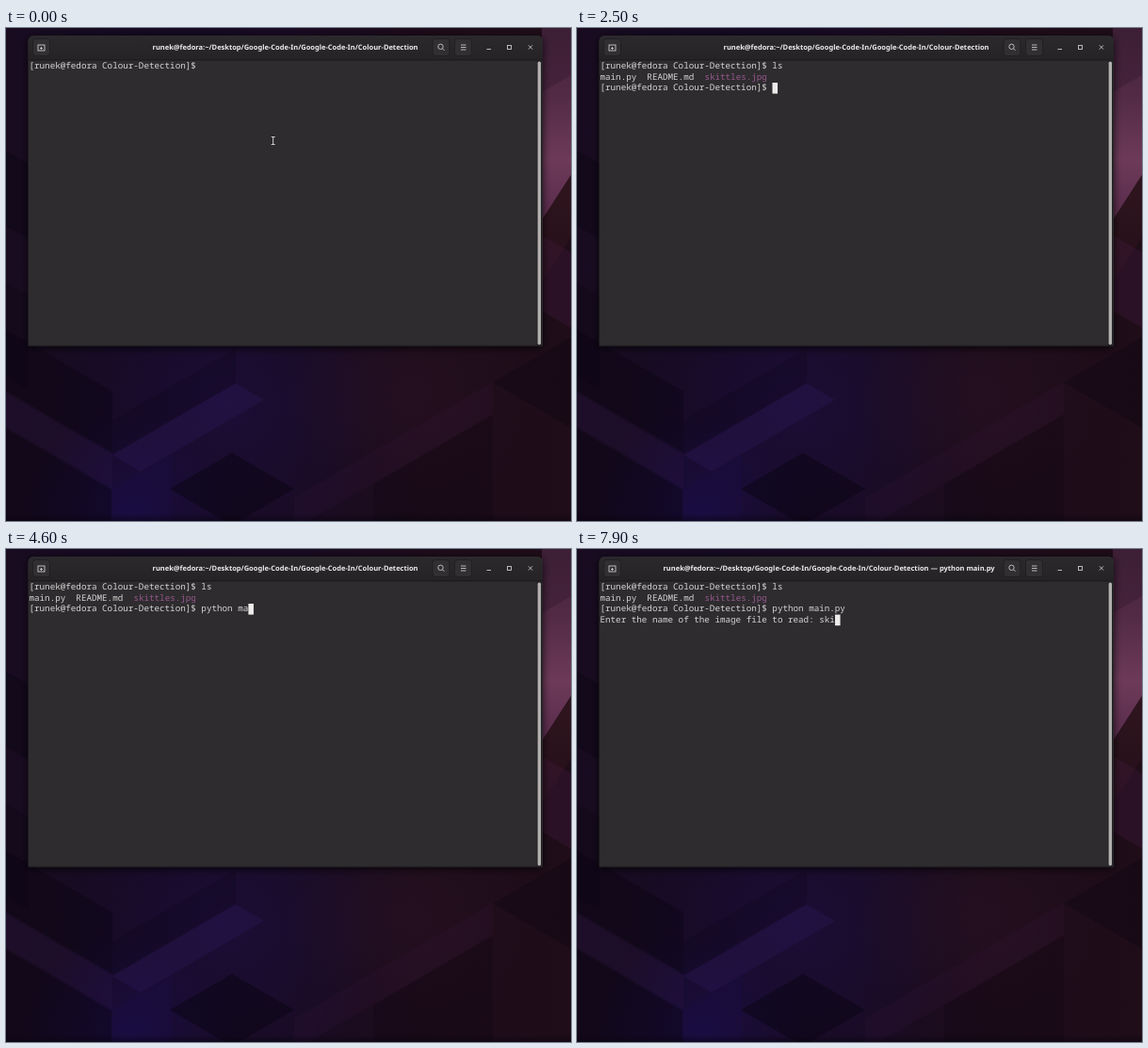
Recreate the animation shown at these times as an HTML page with a canvas. Size 600 px wide and 523 px high, loop 8 s.

```html
<!DOCTYPE html>
<html lang="en">
<head>
<meta charset="utf-8">
<title>Terminal session</title>
<style>
  html, body { margin: 0; width: 100%; height: 100%; overflow: hidden; background: #140a18; }
  canvas { display: block; }
</style>
</head>
<body>
<canvas id="stage" width="600" height="523"></canvas>
<script>
const ctx = document.getElementById('stage').getContext('2d');
const W = 600, H = 523, LOOP = 8000, BLINK = 600;
const CELL = { x: 24.5, y: 34.8, w: 5.545, h: 11.6 };
const USER = 'runek@fedora';
const PROMPT = `[${USER} Colour-Detection]$ `;
const PATH = `${USER}:~/Desktop/Google-Code-In/Google-Code-In/Colour-Detection`;
const QUESTION = 'Enter the name of the image file to read: ';

const LIST = { text: 'ls', start: 1500, step: 200, enter: 2100 };
const RUN = { text: 'python ma', start: 3300, step: 150, enter: 5600 };
const FILE = { text: 'ski', start: 7400, step: 200 };
const COMPLETE = 4700, ASK = 6700;

const keyTimes = ({ text, start, step }) => [...text].map((_, i) => start + i * step);
const typed = (entry, t) => entry.text.slice(0, keyTimes(entry).filter(k => k <= t).length);
const PRESSES = [...keyTimes(LIST), LIST.enter, ...keyTimes(RUN), COMPLETE, RUN.enter, ...keyTimes(FILE)];

function linear(x0, y0, x1, y1, ...colors) {
  const g = ctx.createLinearGradient(x0, y0, x1, y1);
  colors.forEach((c, i) => g.addColorStop(i / (colors.length - 1), c));
  return g;
}

function glow(x, y, r, rgb, alpha) {
  const g = ctx.createRadialGradient(x, y, 0, x, y, r);
  g.addColorStop(0, `rgba(${rgb},${alpha})`);
  g.addColorStop(1, `rgba(${rgb},0)`);
  ctx.fillStyle = g;
  ctx.fillRect(0, 0, W, H);
}

// Isometric directions, scaled by horizontal run (or by height for DOWN).
const RISE = [1, -0.58], FALL = [1, 0.58], DOWN = [0, 1];

function face(fill, x, y, u, ul, v, vl) {
  const at = (a, b) => [x + a * ul * u[0] + b * vl * v[0], y + a * ul * u[1] + b * vl * v[1]];
  ctx.fillStyle = fill;
  ctx.beginPath();
  [at(0, 0), at(1, 0), at(1, 1), at(0, 1)].forEach(p => ctx.lineTo(...p));
  ctx.fill();
}

function roundBox(x, y, w, h, r, fill, stroke) {
  ctx.beginPath();
  ctx.roundRect(x, y, w, h, r);
  ctx.fillStyle = fill;
  ctx.fill();
  if (stroke) {
    ctx.strokeStyle = stroke;
    ctx.lineWidth = 1;
    ctx.stroke();
  }
}

function line(x0, y0, x1, y1) {
  ctx.beginPath();
  ctx.moveTo(x0, y0);
  ctx.lineTo(x1, y1);
  ctx.stroke();
}

function wallpaper() {
  const shade = a => `rgba(6,3,12,${a})`;
  ctx.fillStyle = linear(0, 0, W, 0, '#190c21', '#150a22', '#190b23', '#1d0c1a', '#1f0d18');
  ctx.fillRect(0, 0, W, H);
  glow(230, 400, 170, '32,16,76', 0.45);
  glow(130, 515, 110, '29,15,82', 0.55);
  glow(430, 390, 130, '46,20,40', 0.4);

  // cubes around the two lower corners where the edges meet
  face(shade(0.3), 0, 320, FALL, 113, DOWN, 65);
  face('rgba(60,28,90,.15)', 0, 387, FALL, 113, DOWN, 36);
  face(shade(0.3), 0, 425, FALL, 112, DOWN, H);
  face(shade(0.15), 113, 416, RISE, 131, DOWN, 36);
  face('rgba(62,36,122,.18)', 113, 453, RISE, 131, FALL, 30);
  face('rgba(30,15,90,.14)', 113, 489, RISE, 62, DOWN, 80);
  face(shade(0.42), 174, 489, RISE, 66, FALL, 66);
  face('rgba(65,28,72,.12)', 306, 498, RISE, 211, DOWN, 34);
  face(shade(0.2), 390, 484, RISE, 127, DOWN, 120);
  face(shade(0.25), 517, 376, RISE, 83, FALL, 83);

  // right edge
  face(linear(0, 0, 0, 210, '#45243c', '#522a45', '#6d3a59', '#56294a'), 569, 0, [31, -48], 1, DOWN, 204);
  face('rgba(28,12,28,.22)', 569, 0, RISE, 31, DOWN, 68);
  face(linear(0, 155, 0, 250, '#2f151e', '#27101a'), 569, 204, [31, -48], 1, DOWN, 66);
  face('rgba(66,28,60,.35)', 569, 220, FALL, 31, DOWN, 80);

  // left edge
  face(shade(0.35), 0, 130, FALL, 24, DOWN, 80);
  face(shade(0.2), 0, 270, FALL, 24, DOWN, 100);

  ctx.fillStyle = linear(0, H - 8, 0, H, shade(0), shade(0.45));
  ctx.fillRect(0, H - 8, W, 8);
}

function headerIcons() {
  for (const x of [28.5, 453, 476.5]) roundBox(x, 11.5, 18, 18, 3, '#312f32', '#211f22');
  ctx.strokeStyle = '#c9c7c6';
  ctx.lineWidth = 0.9;

  // new tab
  ctx.strokeRect(34, 18, 7, 6);
  line(36, 21.5, 39, 21.5);
  line(37.5, 20, 37.5, 23);
  // search
  ctx.beginPath();
  ctx.arc(461.5, 19.8, 2.7, 0, Math.PI * 2);
  ctx.stroke();
  line(463.5, 21.8, 465.5, 23.8);
  // menu
  for (let i = 0; i < 3; i++) line(483, 18 + i * 2.5, 488.5, 18 + i * 2.5);
  // window controls
  line(510.5, 22.5, 515, 22.5);
  ctx.strokeRect(532.5, 18.5, 4, 4);
  line(554.8, 18.3, 559, 22.5);
  line(559, 18.3, 554.8, 22.5);
}

function windowFrame() {
  const x = 23.5, y = 8, w = 546.5;
  ctx.save();
  ctx.shadowColor = 'rgba(0,0,0,.75)';
  ctx.shadowBlur = 9;
  ctx.shadowOffsetY = 2;
  roundBox(x, y, w, 329.5, [6, 6, 0, 0], '#2e2c2f');
  ctx.restore();
  roundBox(x, y, w, 26, [6, 6, 0, 0], linear(0, y, 0, 34, '#2b292c', '#252326'));
  ctx.fillStyle = '#1a191b';
  ctx.fillRect(x, 33.5, w, 1);
  ctx.fillRect(x, 336.7, w, 1);
  ctx.fillStyle = '#252326';
  ctx.fillRect(563.5, 34.5, 6, 302);
  roundBox(564.6, 35.5, 3.4, 300.5, 1.7, '#b2b0ae');
  headerIcons();
}

function write(col, row, text, color = '#d6d4d2') {
  ctx.font = '9.24px "Noto Sans Mono", monospace';
  ctx.textAlign = 'left';
  ctx.fillStyle = color;
  ctx.fillText(text, CELL.x + col * CELL.w, CELL.y + row * CELL.h + 8.3);
}

// The block blinks from the latest key press on.
function cursorVisible(t) {
  const last = PRESSES.filter(p => p <= t).pop() ?? -1000;
  return Math.floor((t - last) / BLINK) % 2 === 0;
}

function terminal(t) {
  const command = t >= COMPLETE ? 'python main.py ' : typed(RUN, t);
  const rows = [PROMPT + typed(LIST, t)];
  if (t >= LIST.enter) rows.push('main.py  README.md  ', PROMPT + command);
  if (t >= RUN.enter) rows.push(t >= ASK ? QUESTION + typed(FILE, t) : '');
  rows.forEach((text, row) => write(0, row, text));
  if (t >= LIST.enter) write(rows[1].length, 1, 'skittles.jpg', '#96588b');

  if (cursorVisible(t)) {
    const row = rows.length - 1;
    ctx.fillStyle = '#eeecea';
    ctx.fillRect(CELL.x + rows[row].length * CELL.w, CELL.y + row * CELL.h, CELL.w, CELL.h);
  }
}

function title(t) {
  const running = t >= RUN.enter;
  ctx.font = 'bold 7.5px "Noto Sans", sans-serif';
  ctx.textAlign = 'center';
  ctx.fillStyle = '#eeeceb';
  ctx.fillText(PATH + (running ? ' — python main.py' : ''), running ? 267.5 : 296.5, 23.2);
}

function pointer(x, y) {
  for (const [width, color] of [[2.2, '#1c1b1d'], [1, '#dddbd9']]) {
    ctx.lineWidth = width;
    ctx.strokeStyle = color;
    line(x, y - 4, x, y + 4);
    for (const end of [y - 4, y + 4]) line(x - 2, end, x + 2, end);
  }
}

function draw(now) {
  const t = now % LOOP;
  ctx.textRendering = 'geometricPrecision';
  wallpaper();
  windowFrame();
  title(t);
  terminal(t);
  if (t < LIST.start) pointer(283.7, 119.6);
  requestAnimationFrame(draw);
}

requestAnimationFrame(draw);
</script>
</body>
</html>
```
